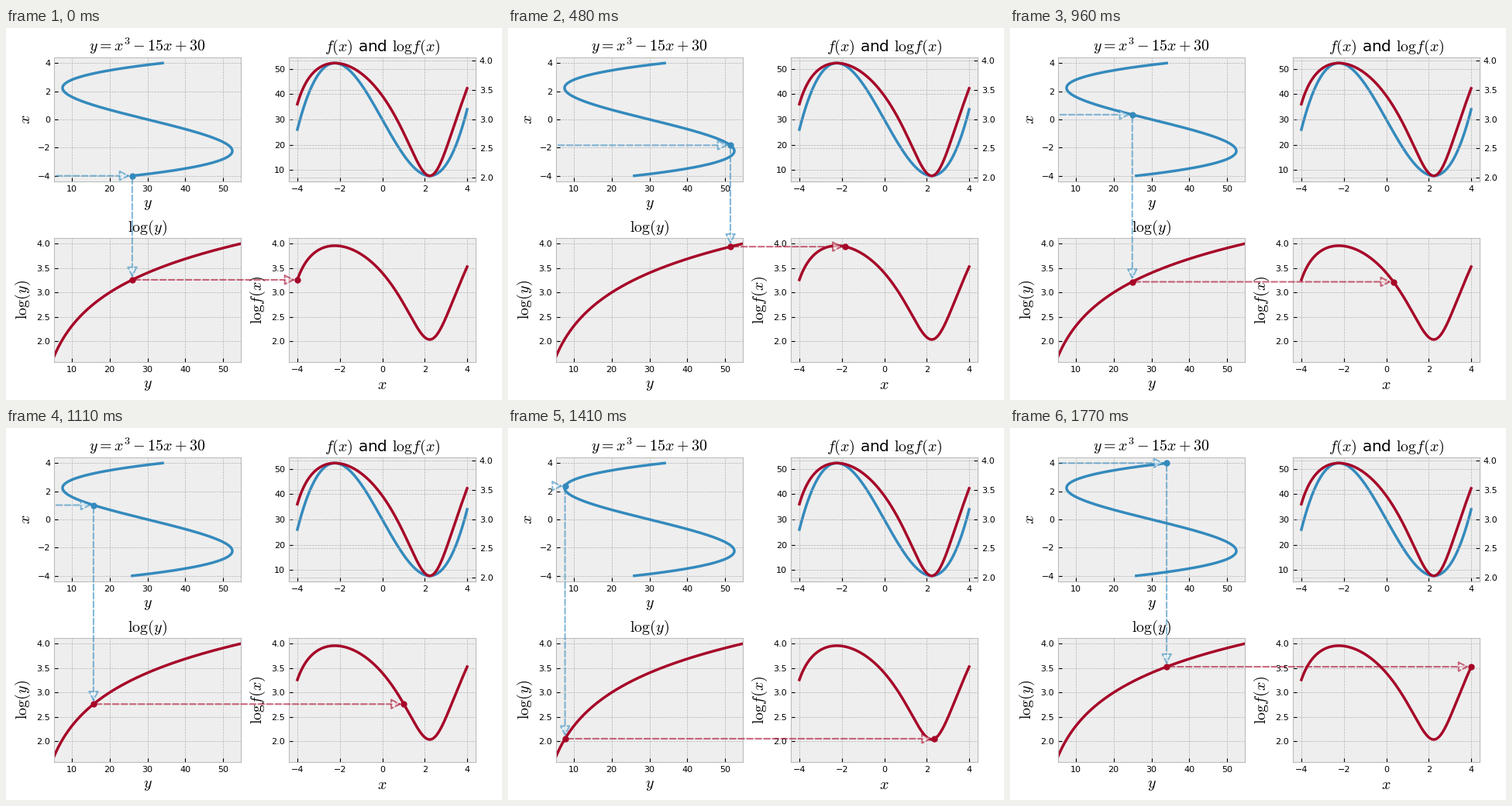
Write a matplotlib script that moves like this. It is 640x480 px and loops after 1800 ms.

```python
import numpy as np
import matplotlib.pyplot as plt
from matplotlib.animation import FuncAnimation
from matplotlib.patches import ConnectionPatch

W, H, DPI = 640, 480, 100
FRAMES, INTERVAL = 60, 30
BLUE, RED = "#348ABD", "#A60628"

plt.style.use("bmh")
plt.rcParams.update({
    "font.family": "DejaVu Sans",
    "xtick.labelsize": 8,
    "ytick.labelsize": 8,
    "axes.titlesize": 14.4,
    "axes.labelsize": 14.4,
    "lines.linewidth": 2.5,
})

fig = plt.figure(figsize=(W / DPI, H / DPI), dpi=DPI, facecolor="white")


def f(x):
    return x**3 - 15 * x + 30


def panel(left, top, width=241, height=160):
    return fig.add_axes([left / W, 1 - (top + height) / H, width / W, height / H])


def link(ax_a, a, ax_b, b, color):
    arrow = ConnectionPatch(
        a, b, "data", "data", axesA=ax_a, axesB=ax_b, arrowstyle="-|>",
        shrinkA=2, shrinkB=2, mutation_scale=20, ls="--", lw=1.5,
        ec=color, fc="white", alpha=0.6, zorder=10)
    fig.add_artist(arrow)
    return arrow


def dot(ax, color):
    return ax.plot([], [], "o", ms=5, color=color, zorder=5)[0]


inverse, both = panel(62, 38), panel(365, 38)
log_ax, result = panel(62, 271), panel(365, 271)

x = np.linspace(-4, 4, 400)
y = f(x)

inverse.plot(y, x, color=BLUE)
inverse.set(title="$y = x^3 - 15x + 30$", xlabel="$y$", ylabel="$x$")

both.plot(x, y, color=BLUE)
both.set_title(r"$f(x)$ and $\mathrm{log}f(x)$")
twin = both.twinx()
twin.plot(x, np.log(y), color=RED)

y_lim = inverse.get_xlim()
ys = np.linspace(*y_lim, 400)
log_ax.plot(ys, np.log(ys), color=RED)
log_ax.set(title=r"$\log(y)$", xlabel="$y$", ylabel=r"$\log(y)$", xlim=y_lim)

result.plot(x, np.log(y), color=RED)
result.set(xlabel="$x$", ylabel=r"$\mathrm{log}f(x)$", ylim=log_ax.get_ylim())

dots = [dot(inverse, BLUE), dot(log_ax, RED), dot(result, RED)]
arrows = []


def update(i):
    xi = -4 + 8 * i / (FRAMES - 1)
    yi = f(xi)
    li = np.log(yi)
    points = [(yi, xi), (yi, li), (xi, li)]
    for d, (px, py) in zip(dots, points):
        d.set_data([px], [py])
    while arrows:
        arrows.pop().remove()
    arrows.extend([
        link(inverse, (y_lim[0], xi), inverse, points[0], BLUE),
        link(inverse, points[0], log_ax, points[1], BLUE),
        link(log_ax, points[1], result, points[2], RED),
    ])
    return dots + arrows


anim = FuncAnimation(fig, update, frames=FRAMES, interval=INTERVAL,
                     repeat=True, repeat_delay=0, blit=False)
plt.show()
```
